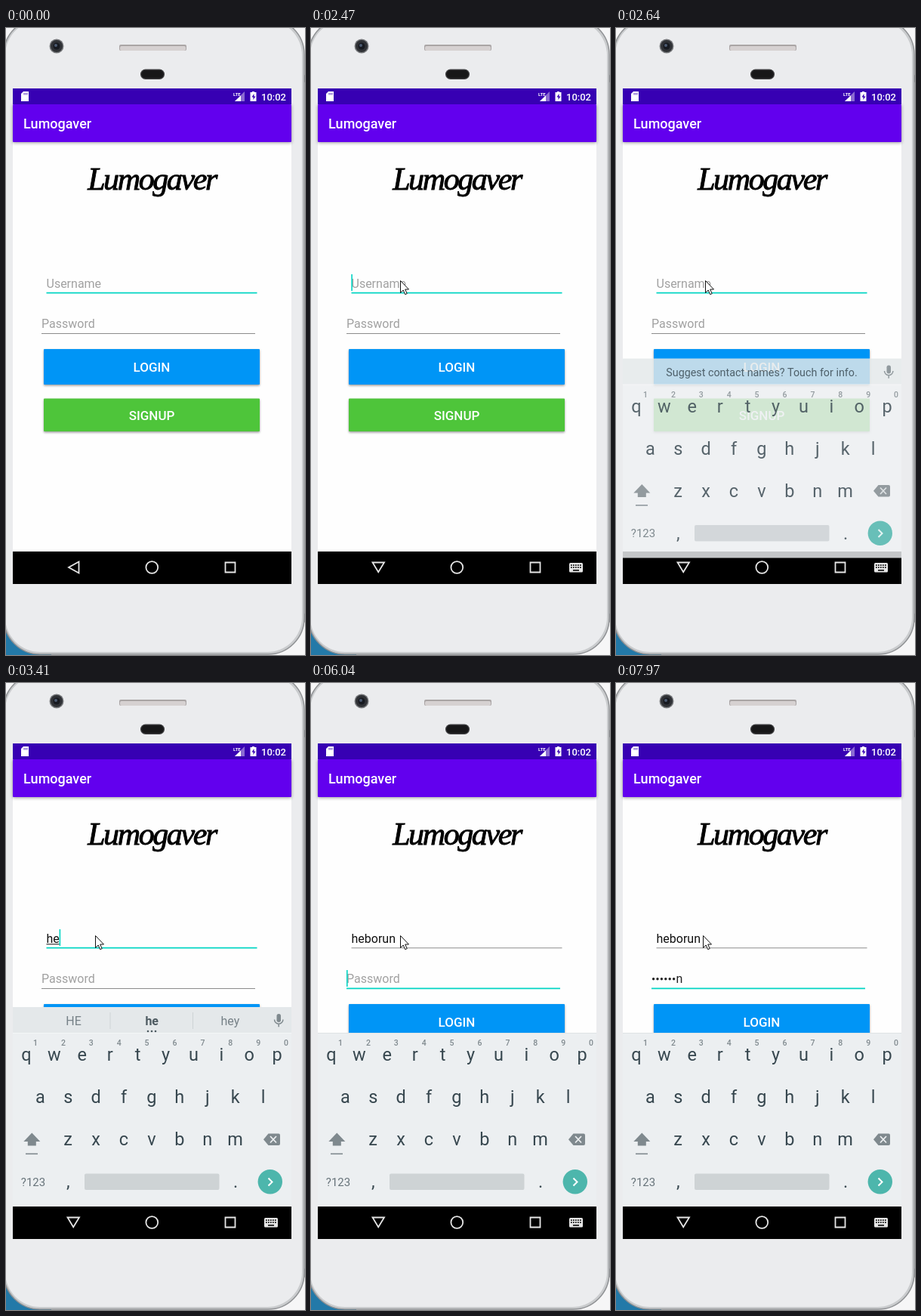
An HTML page with a canvas that plays this animation: 396x830 px, repeating every 8000 ms.

```html
<!DOCTYPE html>
<html lang="en">
<head>
<meta charset="utf-8">
<title>Login screen</title>
<style>
  html, body { margin: 0; width: 100%; height: 100%; overflow: hidden; background: #fff; }
  canvas { display: block; }
</style>
</head>
<body>
<canvas id="stage" width="396" height="830"></canvas>
<script>
const ctx = document.getElementById('stage').getContext('2d');
const LOOP = 8000;
const APP = 'Lumogaver', USER = 'heborun';
const TEAL = '#03d5c4', KEY = '#37474f', SOFT = '#7f898e';

// Each timeline holds rows of [start, ...values]; the latest started row applies.
const POINTER = [
  [900, 342, 778], [980, 272, 622], [1060, 178, 468], [1150, 119, 375],
  [1300, 116, 366], [1380, 115, 360], [1540, 117, 351], [1620, 118, 341],
  [1690, 118, 330], [2000, 121, 319], [2150, 118, 330], [2470, 118, 334], [7970, 115, 334]
];
const CARET = [
  [0, 0], [120, 1], [670, 0], [1150, 1], [1690, 0], [2150, 1], [2570, 0],
  [3100, 1], [4800, 0], [5030, 1], [5500, 0], [6040, 1], [7590, 0]
];
// typed letters, underlined, suggestion set
const TYPING = [
  [0, 0, 0, 0], [3100, 1, 0, 0], [3250, 1, 1, 1], [3330, 2, 0, 1], [3410, 2, 1, 2],
  [3480, 3, 0, 2], [3650, 3, 1, 3], [3880, 4, 0, 3], [3950, 4, 1, 4],
  [4020, 5, 1, 4], [4170, 7, 0, 4], [4250, 7, 1, 5]
];
const SECRET = [[0, 0], [6120, 1], [6350, 2], [6500, 3], [6810, 5], [7040, 7]];
// vertical offset and opacity of the keyboard as it slides in
const SLIDE = [[2570, 26, 0.4], [2640, 8.5, 0.83], [2710, 2, 0.96], [2790, 0, 1]];
const SUGGESTIONS = [
  null, ['H', 'h', 'he'], ['HE', 'he', 'hey'], ['Web', 'heb', 'her'],
  ['Hero', 'hebo', 'hobo'], ['Harbour', USER, 'Helor an']
];

const at = (rows, t) => rows.filter(row => row[0] <= t).pop();

function rect(x, y, w, h, color, radius = 0) {
  ctx.fillStyle = color;
  ctx.beginPath();
  ctx.roundRect(x, y, w, h, radius);
  ctx.fill();
}

function disc(x, y, r, color) {
  ctx.fillStyle = color;
  ctx.beginPath();
  ctx.arc(x, y, r, 0, 7);
  ctx.fill();
}

function fillPath(d, color) {
  ctx.fillStyle = color;
  ctx.fill(new Path2D(d));
}

function strokePath(d, color, width) {
  ctx.strokeStyle = color;
  ctx.lineWidth = width;
  ctx.stroke(new Path2D(d));
}

function text(str, x, y, size, color, align = 'left', weight = 400) {
  ctx.font = `${weight} ${size}px Roboto, sans-serif`;
  ctx.textAlign = align;
  ctx.fillStyle = color;
  ctx.fillText(str, x, y);
  return ctx.measureText(str).width;
}

function shadowed(x, y, w, h, color, blur, drop) {
  ctx.save();
  ctx.shadowColor = 'rgba(0,0,0,.4)';
  ctx.shadowBlur = blur;
  ctx.shadowOffsetY = drop;
  rect(x, y, w, h, color, 1);
  ctx.restore();
}

function drawPhone() {
  rect(0, 0, 396, 830, '#f6f6f7');
  rect(0, 780, 60, 50, '#2379a8');
  rect(391, 62, 5, 10, '#8d8f92', 1);
  rect(391, 775, 5, 12, '#a5a7aa', 1);
  ctx.beginPath();
  ctx.roundRect(-3, -13, 398, 842, 48);
  ctx.fillStyle = '#c9cbcd';
  ctx.fill();
  ctx.strokeStyle = '#8f9194';
  ctx.lineWidth = 1.5;
  ctx.stroke();
  rect(-1, -10, 393, 836, '#ebecee', 46);

  disc(67, 24, 9.5, '#77797c');
  disc(67, 24, 8, '#303236');
  disc(67, 24, 4.5, '#171a20');
  disc(66, 23, 2, '#4c5a70');
  rect(150, 22, 89, 8, '#aaa5a5', 2);
  rect(151, 24, 87, 6, '#d6d1d1', 2);
  rect(178, 54.5, 32, 13.5, '#39393b', 6.7);
  rect(179.5, 56, 29, 10.5, '#171718', 5);
}

function drawStatusBar() {
  rect(9, 80, 369, 21, '#3700b3');
  fillPath('M23 84h7v13H20V87z', '#fff');
  strokePath('M24 86v2.5M26 86v2.5M28 86v2.5', '#3700b3', 0.8);
  text('LTE', 301, 90, 6, '#fff', 'left', 700);
  fillPath('M316 84v13h-13z', '#8b6ad2');
  fillPath('M311 89.500V97h-8z', '#fff');
  fillPath('M326 84h3v1h2.500v12h-8V85h2.500z', '#fff');
  fillPath('M328.500 87l-3 4.500h2V95l3-4.500h-2z', '#3700b3');
  text('10:02', 338, 95.5, 13, '#fff', 'left', 500);
}

function drawField(hint, x, baseline, width, focused) {
  if (hint) text(hint, x, baseline, 16, '#a1a1a1');
  rect(x, baseline + (focused ? 6.3 : 6.7), width, focused ? 1.7 : 1, focused ? TEAL : '#8c8c8c');
}

function drawButton(label, y, h, color) {
  shadowed(50, y, 286, h, color, 3, 1.5);
  text(label, 193, y + h / 2 + 6.5, 17, '#fff', 'center', 500);
}

function drawApp(t) {
  rect(9, 80, 369, 656, '#fefefe');
  shadowed(9, 101, 369, 50, '#6200ee', 4, 1);
  drawStatusBar();
  text(APP, 23, 133, 18, '#fff', 'left', 500);

  ctx.font = 'italic 42px "Liberation Serif", serif';
  ctx.letterSpacing = '-2.4px';
  ctx.textAlign = 'center';
  ctx.fillStyle = ctx.strokeStyle = '#000';
  ctx.lineWidth = 0.9;
  ctx.fillText(APP, 193, 214);
  ctx.strokeText(APP, 193, 214);
  ctx.letterSpacing = '0px';

  const onPassword = t >= 5030;
  const [, typed, underlined] = at(TYPING, t);
  const secret = at(SECRET, t)[1];
  drawField(typed ? '' : 'Username', 53.5, 343.5, 279, !onPassword);
  drawField(secret ? '' : 'Password', 47, 397.3, 283, onPassword);

  const nameWidth = text(USER.slice(0, typed), 53.5, 343.5, 16, '#111');
  if (underlined && !onPassword) rect(53.5, 345.3, nameWidth, 1, '#111');

  let secretWidth = 0;
  if (secret) {
    for (let i = 0; i < secret - 1; i++) disc(49.6 + i * 5.4, 391.8, 1.7, '#222');
    secretWidth = (secret - 1) * 5.4;
    secretWidth += text(USER[secret - 1], 47 + secretWidth, 397.3, 16, '#222');
  }
  if (at(CARET, t)[1]) {
    if (onPassword) rect(47 + secretWidth, 380, 1.6, 22, TEAL);
    else rect(53.3 + nameWidth, 326, 1.6, 22, TEAL);
  }
  drawButton('LOGIN', 425, 47, '#0095f6');
  drawButton('SIGNUP', 490.5, 43.5, '#4ec53a');
}

function drawSuggestions(words) {
  rect(9, 429, 369, 35, '#e4e8ea');
  rect(9, 463, 369, 1, '#f4f6f7');
  rect(357.5 + 1, 438, 5.5, 11, SOFT, 2.7);
  strokePath('M355.500 445.500a5.700 5.700 0 0 0 11.400 0M361.200 451.200v4', SOFT, 1.5);
  if (!words) {
    text('Suggest contact names? Touch for info.', 193, 452.5, 14.3, KEY, 'center');
    return;
  }
  const known = words[1] === 'he';
  words.forEach((word, i) => {
    const bold = known && i === 1;
    text(word, 89.5 + i * 103.7, 453, 16, bold ? '#4d5a61' : '#768187', 'center', bold ? 700 : 400);
  });
  rect(137.5, 436, 1, 22, '#cdd3d6');
  rect(247, 436, 1, 22, '#cdd3d6');
  for (const x of [188, 193, 198]) disc(x, 461, 1.3, '#4d5a61');
}

function drawKeyboard(t) {
  const slide = at(SLIDE, t);
  if (!slide) return;
  ctx.save();
  ctx.beginPath();
  ctx.rect(9, 80, 369, 656);
  ctx.clip();
  ctx.translate(0, slide[1]);
  ctx.globalAlpha = slide[2];

  rect(9, 464, 369, 229, '#eceff1');
  if (t < 5030) drawSuggestions(SUGGESTIONS[at(TYPING, t)[3]]);
  else rect(9, 463, 369, 1, '#dfe3e5');

  [['qwertyuiop', 27, 500], ['asdfghjkl', 45.3, 556], ['zxcvbnm', 82.2, 612]].forEach(([row, x, y]) =>
    [...row].forEach((key, i) => text(key, x + i * 36.9, y, 23.5, KEY, 'center')));
  for (let i = 0; i < 10; i++) text((i + 1) % 10, 39 + i * 36.9, 480, 10.5, SOFT, 'center', 500);

  fillPath('M34.300 595.500l11 11.500h-5.500v5.500h-11V607h-5.500z', SOFT);
  rect(26, 622.5, 16, 1.6, SOFT);
  fillPath('M347.500 596.500H361q2 0 2 2v11.500q0 2-2 2h-13.500l-6.500-7.700z', SOFT);
  strokePath('M350 600l8 8.500M358 600l-8 8.500', '#eceff1', 1.8);

  text('?123', 36, 665.5, 15, '#67737a', 'center');
  text(',', 82.3, 668, 23.5, KEY, 'center');
  text('.', 304, 668, 23.5, KEY, 'center');
  rect(104, 649.5, 178.5, 21.5, '#ced3d5', 2);
  disc(349.8, 660.3, 16.2, '#4db6ac');
  strokePath('M347.500 655.500l5 5-5 5', '#fff', 2);
  ctx.restore();
}

function drawNavIcons(keyboardUp) {
  const white = '#e6e6e6';
  strokePath(keyboardUp ? 'M81.500 707.500h15.500l-7.800 12.800z' : 'M96.500 706.500v15l-13.500-7.500z', white, 1.8);
  ctx.beginPath();
  ctx.arc(193.3, 714, 7.9, 0, 7);
  ctx.stroke();
  strokePath('M290.500 707.500h13v13h-13z', white, 1.8);
  if (!keyboardUp) return;
  rect(342, 708, 18, 12.5, white, 1.5);
  for (let i = 0; i < 5; i++) {
    rect(344 + i * 3, 710.3, 1.7, 1.7, '#111');
    rect(344 + i * 3, 713.3, 1.7, 1.7, '#111');
  }
  rect(347, 717, 8, 1.7, '#111');
}

function drawPointer(t) {
  const spot = at(POINTER, t);
  if (!spot) return;
  ctx.save();
  ctx.translate(spot[1] + 0.5, spot[2] + 0.5);
  const arrow = 'M0 0v16l3.700-3.500 2.500 5.700 2.500-1.100-2.500-5.600H11z';
  fillPath(arrow, '#fff');
  strokePath(arrow, '#111', 1);
  ctx.restore();
}

function draw() {
  const t = performance.now() % LOOP;
  drawPhone();
  drawApp(t);
  rect(9, 693, 369, 43, '#000');
  drawKeyboard(t);
  drawNavIcons(t >= 2470);
  drawPointer(t);
  requestAnimationFrame(draw);
}
draw();
</script>
</body>
</html>
```
